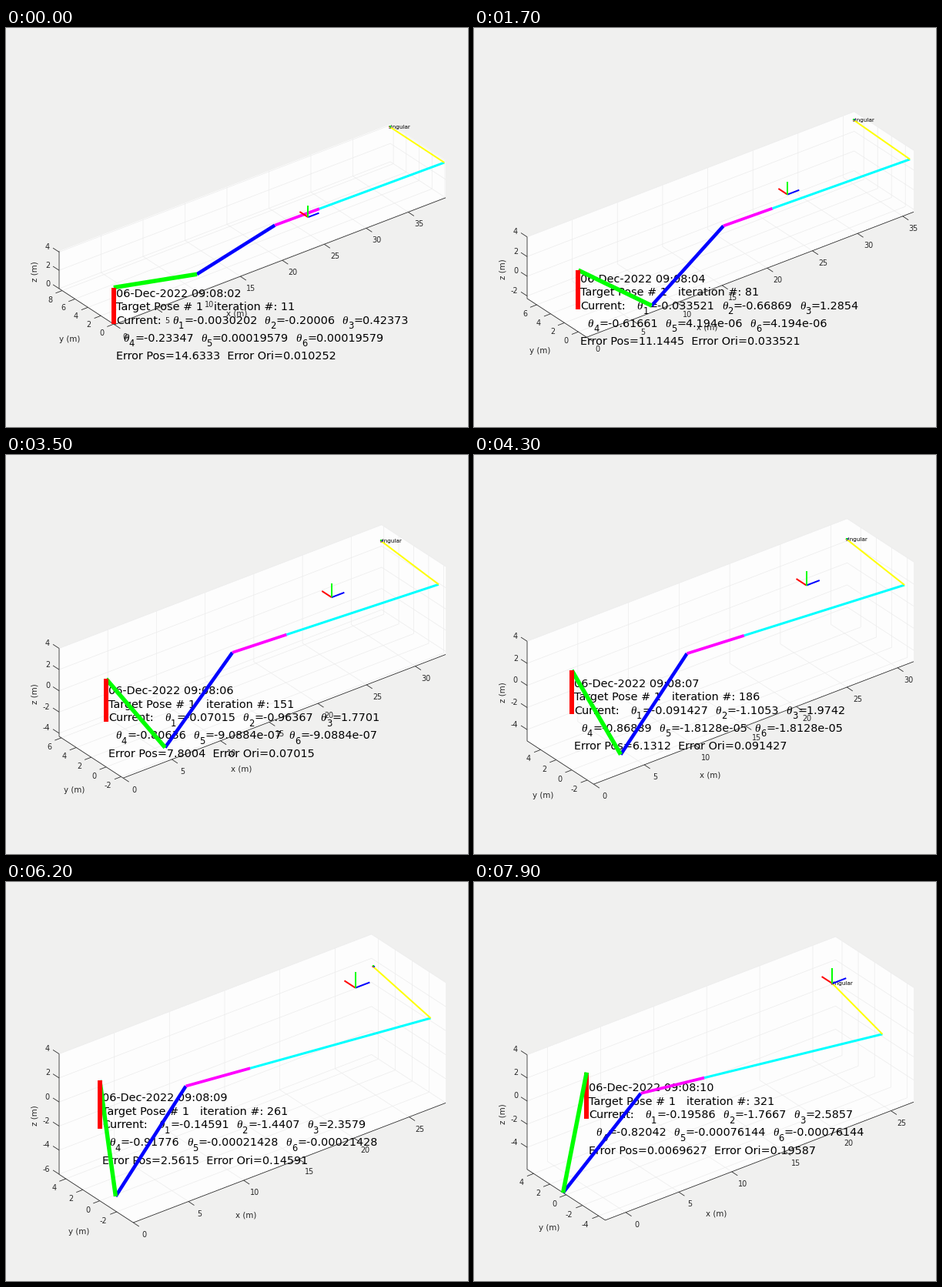
Animation, 600 px wide and 519 px high, one loop 8000 ms. Source, as a matplotlib script:

```python
import numpy as np
import matplotlib.pyplot as plt
from matplotlib.animation import FuncAnimation
from matplotlib.collections import LineCollection

W, H, DPI = 600, 519, 96
PT = 72 / DPI                       # points per pixel
FRAMES = 80
INK = "#262626"

# screen directions of x, y, z for azimuth -37.5, elevation 30 (screen y down)
AZ, EL = np.radians([-37.5, 30])
VIEW = np.array([
    [np.cos(AZ), np.sin(EL) * np.sin(AZ)],
    [np.sin(AZ), -np.sin(EL) * np.cos(AZ)],
    [0, -np.cos(EL)],
])

# solver state at a few moments, by step number
KEY_FRAMES = [0, 17, 35, 43, 53, 62, 79]
STEPS = np.array([0, 14, 28, 35, 43, 50, 62])
T1 = np.array([-.0030202, -.033521, -.07015, -.091427, -.11877, -.14591, -.19586])
T2 = np.array([-.20006, -.66869, -.96367, -1.1053, -1.2751, -1.4407, -1.7667])
T3 = np.array([.42373, 1.2854, 1.7701, 1.9742, 2.1873, 2.3579, 2.5857])
T4 = np.array([-.233467, -.61661, -.80636, -.86889, -.91233, -.91776, -.82042])
T5 = np.array([.00019579, 4.194e-06, -9.0884e-07, -1.8128e-05,
               -7.6504e-05, -.00021428, -.00076144])
ERR = np.array([14.6333, 11.1445, 7.8004, 6.1312, 4.226, 2.5615, .0069627])

# the elbow opens like a square root, so its square is what moves evenly
STATE = np.stack([T1, T2 + T3 / 2, T3 ** 2, T2 + T3 + T4, T5, ERR], axis=1)
SLOPE = np.gradient(STATE, STEPS, axis=0)

BASE_H, UPPER, FORE, WRIST, BOOM, TOOL = 4, 10.1, 9.5, 5.3, 14.85, 8.46
GOAL_AXIS, TIP_AXIS = 1.3, .13


def state_at(step):
    """Cubic Hermite through the key states."""
    i = min(np.searchsorted(STEPS, step, side="right") - 1, len(STEPS) - 2)
    h = STEPS[i + 1] - STEPS[i]
    u = (step - STEPS[i]) / h
    v = 1 - u
    a, half, sq, total, t5, err = (
        STATE[i] * v * v * (1 + 2 * u) + STATE[i + 1] * u * u * (3 - 2 * u)
        + h * u * v * (SLOPE[i] * v - SLOPE[i + 1] * u))
    t3 = np.sqrt(sq)
    t2 = half - t3 / 2
    return [a, t2, t3, total - t2 - t3, t5, t5], err


def arm_points(th):
    out = np.array([np.cos(th[0]), np.sin(th[0]), 0])
    side = np.array([-np.sin(th[0]), np.cos(th[0]), 0])
    up = np.array([0, 0, 1])
    pts = [np.zeros(3), BASE_H * up]
    pitch = np.cumsum(th[1:4])
    for length, p in zip((UPPER, FORE, WRIST, BOOM),
                         (pitch[0], pitch[1], pitch[2], pitch[2])):
        pts.append(pts[-1] + length * (np.cos(p) * out + np.sin(p) * up))
    pts.append(pts[-1] + TOOL * side)
    return np.array(pts)


GOAL = arm_points(state_at(STEPS[-1])[0])[-1]
GOAL_ENDS = GOAL + GOAL_AXIS * np.eye(3)

EM = {".": .318, "-": .361, "=": .838, " ": .318, "e": .615}


def advance(s, size):
    return size * sum(EM.get(c, .636) for c in s)


def put(x, y, s, size, color="black", ha="left", va="baseline", **kw):
    ax.text(x, y, s, fontsize=size * PT, color=color, ha=ha, va=va, zorder=3, **kw)


def segments(segs, color, width, z):
    ax.add_collection(LineCollection(segs, colors=color, linewidths=width * PT, zorder=z))


def stroke(p, q, color, width, z):
    ax.plot([p[0], q[0]], [p[1], q[1]], color=color, lw=width * PT, zorder=z,
            solid_capstyle="butt")


def triad(origin, ends, z):
    for end, color in zip(ends, ("#0000ff", "#ff0000", "#00ff00")):
        stroke(origin, end, color, 2, z)


def angles(x, y, first, th, size=14.4):
    for n, t in enumerate(th, first):
        put(x, y, "θ", 15, family="Liberation Serif", style="italic")
        put(x + 7.6, y + 6.5, str(n), 11.5)
        s = f"={t:.5g}"
        put(x + 15, y, s, size)
        x += 15 + advance(s + "  ", size)


def ticks(lo, hi, step):
    first, last = np.ceil(lo / step - 1e-6), np.floor(hi / step + 1e-6)
    return [step * n for n in range(int(first), int(last) + 1)]


def draw_box(lo, hi, proj):
    (x0, y0, z0), (x1, y1, z1) = lo, hi
    outline = proj([[x0, y0, z0], [x1, y0, z0], [x1, y0, z1],
                    [x1, y1, z1], [x0, y1, z1], [x0, y1, z0]])
    ax.fill(*outline.T, color="#fdfdfd", lw=0, zorder=0)
    xs, ys, zs = (ticks(a, b, d) for a, b, d in zip(lo, hi, (5, 2, 2)))

    grid = [proj([[x, y0, z0], [x, y1, z0], [x, y1, z1]]) for x in xs]
    grid += [proj([[x0, y, z0], [x1, y, z0], [x1, y, z1]]) for y in ys]
    grid += [proj([[x0, y1, z], [x1, y1, z], [x1, y0, z]]) for z in zs]
    segments(grid, "#ececec", .7, 1)

    front, right, left, top = proj([[x0, y0, z0], [x1, y0, z0], [x0, y1, z0], [x0, y1, z1]])
    marks = [[right, front, left, top]]
    for vals, at, tick, off, ha in (
            (xs, lambda v: [v, y0, z0], (7.5, 5), (14, 15), "center"),
            (ys, lambda v: [x0, v, z0], (-8.5, 3.3), (-12.5, 11), "right"),
            (zs, lambda v: [x0, y1, v], (-8, -5.2), (-12, -7.5), "right")):
        for v in vals:
            p = proj([at(v)])[0]
            marks.append([p, p + tick])
            put(*(p + off), str(v), 9.6, INK, ha, "center_baseline")
    segments(marks, INK, .8, 2)

    title = dict(size=10.2, color=INK, ha="center", va="center")
    put(*((front + right) / 2 + (-56, 68.5)), "x (m)", **title)
    put(*((front + left) / 2 + (-22, 43)), "y (m)", **title)
    put(38, (left[1] + top[1]) / 2 + 2, "z (m)", rotation=90, **title)


def draw(frame):
    ax.clear()
    ax.set(xlim=(0, W), ylim=(H, 0))
    ax.axis("off")

    step = int(np.interp(frame, KEY_FRAMES, STEPS) + .5)
    th, err = state_at(step)
    arm = arm_points(th)
    tip_ends = arm[-1] + TIP_AXIS * np.eye(3)

    # axis limits hug the data; the box always fills the same width
    cloud = np.vstack([arm, tip_ends, GOAL_ENDS])
    lo, hi = cloud.min(axis=0), cloud.max(axis=0)
    scale = 502 / ((hi - lo) @ np.abs(VIEW[:, 0]))
    mid = (lo + hi) / 2

    def proj(p):
        return (320, 255.5) + scale * (np.asarray(p) - mid) @ VIEW

    draw_box(lo, hi, proj)

    pts = proj(arm)
    bx, by = pts[0] + (3, 0)
    it = 11 + 5 * step
    ori = np.hypot(th[0], sum(th[1:4]))
    pos = f"{err:.6g}" if err >= 10 else f"{err:.5g}"
    put(bx, by - 35.5, f"06-Dec-2022 09:08:{int(2.85 + frame / 10):02d}", 14.4)
    put(bx, by - 18, f"Target Pose # 1   iteration #: {it}", 14.4)
    put(bx, by - .5, "Current:", 14.4)
    angles(bx + 5.09 * 14.4, by - .5, 1, th[:3])
    angles(bx + advance("  ", 14.4), by + 22.5, 4, th[3:])
    put(bx, by + 46, f"Error Pos={pos}  Error Ori={ori:.5g}", 14.4)

    # the upper arm passes in front of the column once it leans back
    upper_z = 8 if np.cos(th[1]) < 0 else 6
    styles = (("#ff0000", 6, 7), ("#00ff00", 5.5, upper_z), ("#0000ff", 4.5, 5),
              ("#ff00ff", 3.8, 5), ("#00ffff", 3, 5), ("#ffff00", 2, 5))
    for p, q, style in zip(pts, pts[1:], styles):
        stroke(p, q, *style)

    tip = pts[-1]
    triad(tip, proj(tip_ends), 6)
    triad(proj(GOAL), proj(GOAL_ENDS), 9)
    if not 246 <= it <= 286:
        put(tip[0] - 2, tip[1], "singular", 7.3, va="center")


plt.rcParams["font.family"] = "DejaVu Sans"
fig = plt.figure(figsize=(W / DPI, H / DPI), dpi=DPI, facecolor="#f0f0ef")
ax = fig.add_axes([0, 0, 1, 1])

anim = FuncAnimation(fig, draw, frames=FRAMES, interval=100, repeat=True,
                     repeat_delay=0, init_func=lambda: None, blit=False)
plt.show()
```
